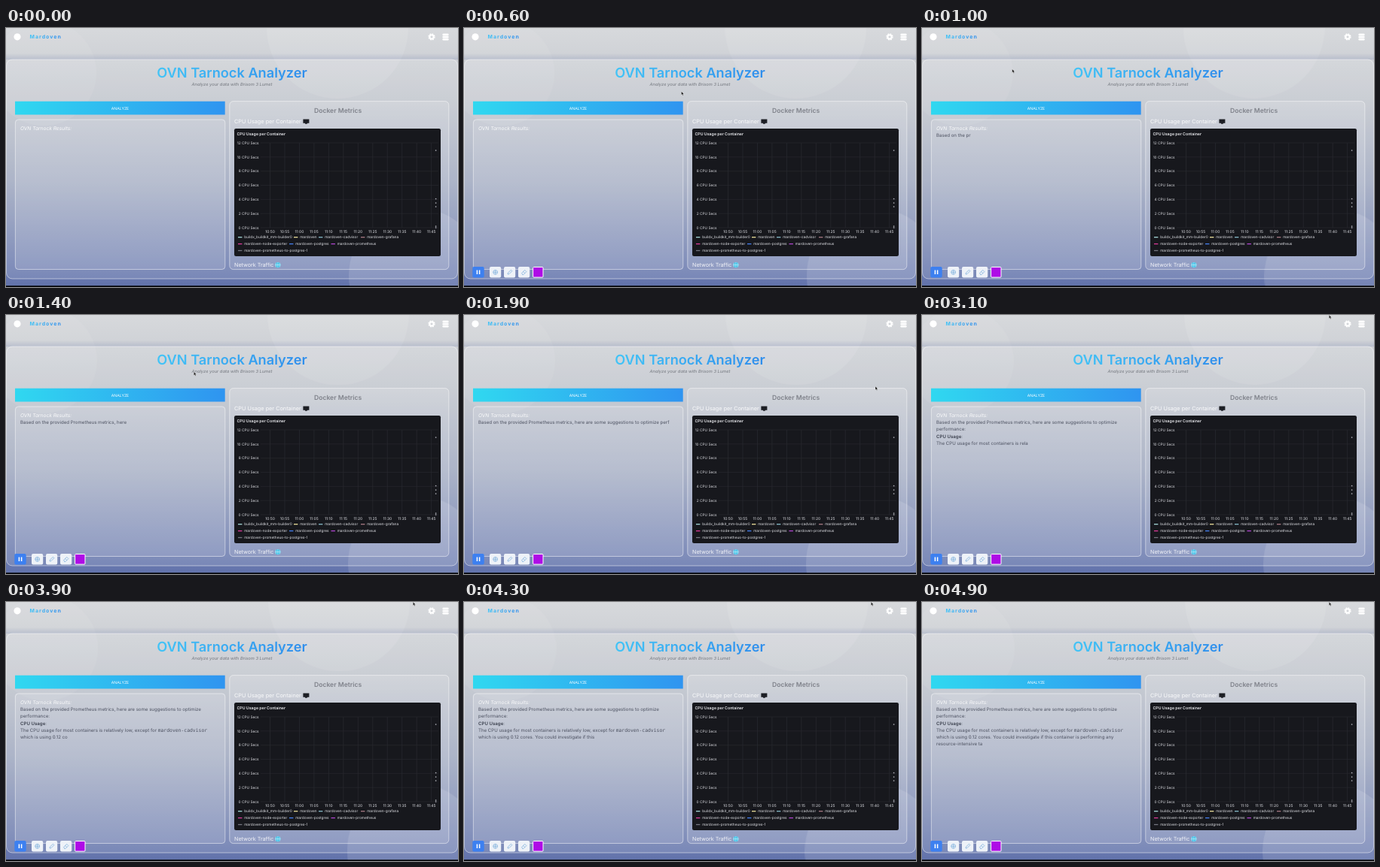
An HTML page that plays this animation: 600x345 px, repeating every 5000 ms.

```html
<!DOCTYPE html>
<html lang="en">
<head>
<meta charset="utf-8">
<title>Analyzer dashboard</title>
<style>
html, body { margin: 0; width: 100%; height: 100%; overflow: hidden; background: #000; }
body { position: relative; font-family: Inter, "Liberation Sans", sans-serif; text-rendering: geometricPrecision; }
svg { position: absolute; left: 0; top: 0; display: block; }
.glass { fill: #fff; fill-opacity: .13; stroke: #fff; stroke-opacity: .55; stroke-width: .9; }
.mid { text-anchor: middle; }
.end { text-anchor: end; }
.blob { animation: drift 5s linear infinite; }
@keyframes drift { to { transform: translate(var(--dx), var(--dy)); } }
#out {
  position: absolute; left: 19px; top: 139.3px; width: 263px;
  font-size: 6.12px; line-height: 9.17px; white-space: pre-wrap; color: #4c5160;
}
#out b { font-weight: 600; color: #3a3f4d; }
#out code { font: 6.4px/1 "DejaVu Sans Mono", monospace; }
</style>
</head>
<body>
<svg width="600" height="345" viewBox="0 0 600 345">
  <defs>
    <linearGradient id="sky" x2="0" y2="1">
      <stop offset="0" stop-color="#d7d9dc"/>
      <stop offset=".28" stop-color="#c3c7ce"/>
      <stop offset=".6" stop-color="#a0a9c0"/>
      <stop offset="1" stop-color="#6273ac"/>
    </linearGradient>
    <linearGradient id="shade" x2="0" y2="1">
      <stop offset="0" stop-color="#5a6ca4" stop-opacity="0"/>
      <stop offset="1" stop-color="#5a6ca4" stop-opacity=".2"/>
    </linearGradient>
    <linearGradient id="brand">
      <stop offset="0" stop-color="#43c4f6"/>
      <stop offset="1" stop-color="#2f8dec"/>
    </linearGradient>
    <linearGradient id="btn">
      <stop offset="0" stop-color="#30d8f0"/>
      <stop offset="1" stop-color="#2f94f0"/>
    </linearGradient>
  </defs>

  <rect width="600" height="343.5" fill="url(#sky)"/>
  <g fill="#fff">
    <circle class="blob" cx="50" cy="60" r="70" fill-opacity=".07" style="--dx:3px;--dy:2px"/>
    <circle class="blob" cx="440" cy="0" r="94" fill-opacity=".1" style="--dx:3px;--dy:-2px"/>
    <circle class="blob" cx="545" cy="330" r="90" fill-opacity=".13" style="--dx:-3px;--dy:2px"/>
  </g>
  <rect y="34" width="600" height="8" fill="url(#shade)"/>
  <rect y="343.5" width="600" height="1.5" fill="#05060a"/>

  <!-- header -->
  <g transform="translate(0 -.5)">
    <circle cx="15" cy="12.3" r="4.6" fill="#fff"/>
    <text x="31.5" y="14.6" font-size="6.9" font-weight="700" letter-spacing="1.05" fill="url(#brand)">Mardoven</text>
    <circle cx="565" cy="12.3" r="2.6" fill="none" stroke="#fff" stroke-width="2"/>
    <circle cx="565" cy="12.3" r="4" fill="none" stroke="#fff" stroke-width="1.3" stroke-dasharray="1.9 1.24"/>
    <g fill="#fff">
      <rect x="579.4" y="8" width="8.2" height="2.7" rx="1.2"/>
      <rect x="579.4" y="11.2" width="8.2" height="2.5" rx="1"/>
      <rect x="579.4" y="14.2" width="8.2" height="2.7" rx="1.2"/>
    </g>
  </g>

  <!-- panels -->
  <rect class="glass" x=".5" y="42" width="599" height="292" rx="8"/>
  <rect class="glass" x="12.4" y="122" width="278.4" height="199.5" rx="4"/>
  <rect class="glass" x="296.8" y="97.6" width="291" height="224" rx="5"/>
  <rect x="12" y="97.7" width="278.7" height="17.8" fill="url(#btn)"/>
  <text class="mid" x="151.5" y="108.5" font-size="5.1" fill="#fff">ANALYZE</text>
  <text class="mid" x="300" y="65.7" font-size="18.2" font-weight="600" fill="url(#brand)">OVN Tarnock Analyzer</text>
  <text class="mid" x="300" y="76.8" font-size="5.75" font-style="italic" fill="#74777f">Analyze your data with Brisom 3 Lumet</text>
  <text x="19" y="136" font-size="6.6" font-style="italic" fill="#fff" fill-opacity=".9">OVN Tarnock Results:</text>
  <text class="mid" x="440.6" y="113" font-size="8.6" font-weight="600" fill="#7f828a">Docker Metrics</text>
  <g fill="#fff" fill-opacity=".9">
    <text x="303" y="127.3" font-size="7.3">CPU Usage per Container</text>
    <text x="303" y="318.3" font-size="7.15">Network Traffic</text>
  </g>
  <path d="M394.4 121.5h8v5.2h-8z M397 126.7h2.8v1.1h-2.8z" fill="#1c1e24"/>
  <circle cx="360.9" cy="315.6" r="3.7" fill="#3fbfe6"/>
  <path d="M357.3 315.6h7.2M360.9 312v7.2M358.5 312.8q-1.2 2.8 0 5.6M363.3 312.8q1.2 2.8 0 5.6" fill="none" stroke="#d8f4fc" stroke-width=".6"/>

  <!-- chart -->
  <rect x="303" y="134" width="274" height="170" rx="2.2" fill="#17181d"/>
  <text x="306.4" y="142.6" font-size="5.25" font-weight="600" fill="#eeeff3">CPU Usage per Container</text>
  <g id="chart"></g>

  <!-- recorder bar -->
  <g id="bar" visibility="hidden">
    <rect x="11.3" y="318" width="15.4" height="14.6" rx="2" fill="#3d80f0"/>
    <path d="M17.4 322.6v5.4M20.6 322.6v5.4" stroke="#fff" stroke-width="1.5"/>
    <g fill="#eef2f8">
      <rect x="34" y="318" width="15.2" height="14.6" rx="2"/>
      <rect x="53" y="318" width="15.2" height="14.6" rx="2"/>
      <rect x="72" y="318" width="15.2" height="14.6" rx="2"/>
    </g>
    <g fill="none" stroke="#7fb0dc" stroke-width=".8">
      <circle cx="41.6" cy="325.3" r="2.9"/>
      <path d="M38.7 325.3h5.8M41.6 322.4v5.8"/>
      <path d="M58 328l.4-1.8 4-4 1.5 1.5-4 4z"/>
      <path d="M76.7 326.4l4-4 2.2 2.2-4 4h-1.3z M78.6 324.5l2.2 2.2"/>
    </g>
    <rect x="91.6" y="318.5" width="13.4" height="13.6" rx="1" fill="#ae0ce6" stroke="#fff"/>
  </g>
</svg>

<div id="out"></div>

<svg width="600" height="345" viewBox="0 0 600 345">
  <path id="mouse" visibility="hidden" d="M0 0v4.7l1.1-1 .8 1.8.9-.4-.8-1.7h1.5z" fill="#111" stroke="#fff" stroke-width=".35"/>
</svg>

<script>
const $ = id => document.getElementById(id);
const LOOP = 5000, STEP = 100;

// chart
const label = (x, y, size, text, cls = "") =>
  `<text class="${cls}" x="${x}" y="${y}" font-size="${size}" fill="#e2e3e8">${text}</text>`;
const line = (x1, y1, x2, y2, color, w) =>
  `<path d="M${x1} ${y1}L${x2} ${y2}" stroke="${color}" stroke-width="${w}"/>`;

const GRID = "#2a2b31";
let svg = "";
for (let i = 0; i < 7; i++) {
  const y = 153 + i * 18.83;
  svg += line(338, y, 574, y, GRID, .6) + label(335.6, y + 1.7, 4.8, `${12 - 2 * i} CPU Secs`, "end");
}
for (let i = 0; i < 12; i++) {
  const x = 350.5 + i * 19.47, min = 50 + i * 5;
  const time = `${10 + Math.floor(min / 60)}:${String(min % 60).padStart(2, "0")}`;
  svg += line(x, 153, x, 266, GRID, .7) + label(x, 272.9, 5, time, "mid");
}
const legend = [
  [308, 278.7, "#a5d8d8", "buildx_buildkit_mm-builder0"],
  [382, 278.7, "#ecdf9a", "mardoven"],
  [415, 278.7, "#86bccb", "mardoven-cadvisor"],
  [471, 278.7, "#a87a84", "mardoven-grafana"],
  [308, 287.6, "#d93a98", "mardoven-node-exporter"],
  [376, 287.6, "#447ff0", "mardoven-postgres"],
  [431.5, 287.6, "#b045d0", "mardoven-prometheus"],
  [308, 296.5, "#74767f", "mardoven-prometheus-to-postgres-1"]
];
for (const [x, y, color, name] of legend)
  svg += line(x, y, x + 5.4, y, color, 1.3) + label(x + 8.2, y + 1.7, 4.78, name);

for (const y of [163, 227.5, 233, 238, 264, 266])
  svg += `<circle cx="570.6" cy="${y}" r=".85" fill="#b4b5bd"/>`;
$("chart").innerHTML = svg;

// typed answer
const runs = [
  ["span", "Based on the provided Prometheus metrics, here are some suggestions to optimize performance:\n"],
  ["b", "CPU Usage"],
  ["span", ":\nThe CPU usage for most containers is relatively low, except for "],
  ["code", "mardoven-cadvisor"],
  ["span", " which is using 0.12 cores. You could investigate if this container is performing any resource-intensive ta"]
].map(([tag, text]) => ({ text, el: $("out").appendChild(document.createElement(tag)) }));

function type(n) {
  for (const { text, el } of runs) {
    el.textContent = text.slice(0, Math.max(0, n));
    n -= text.length;
  }
}

// rows of [time, ...values], linear in between
function at(rows, t) {
  const i = rows.findIndex(r => r[0] > t);
  if (i < 0) return rows[rows.length - 1].slice(1);
  if (i === 0) return rows[0].slice(1);
  const a = rows[i - 1], b = rows[i], k = (t - a[0]) / (b[0] - a[0]);
  return a.slice(1).map((v, j) => v + (b[j + 1] - v) * k);
}
const typing = [[800, 0], [1000, 15], [1900, 84], [2000, 93], [2300, 93], [2450, 104],
  [2600, 104], [3100, 145], [3900, 208], [4900, 292]];
const path = [[100, 345, 76], [600, 288.5, 84.5], [800, 176, 104], [1000, 119.7, 54.8],
  [1300, 190, 72], [1900, 546, 95], [2300, 540.3, 0]];

let start;
function draw(now) {
  start ??= now;
  const t = Math.floor((now - start) % LOOP / STEP) * STEP;
  const shown = t >= 100 ? "visible" : "hidden";
  $("bar").setAttribute("visibility", shown);
  $("mouse").setAttribute("visibility", shown);
  $("mouse").setAttribute("transform", `translate(${at(path, t)})`);
  type(Math.round(at(typing, t)[0]));
  requestAnimationFrame(draw);
}
requestAnimationFrame(draw);
</script>
</body>
</html>
```
